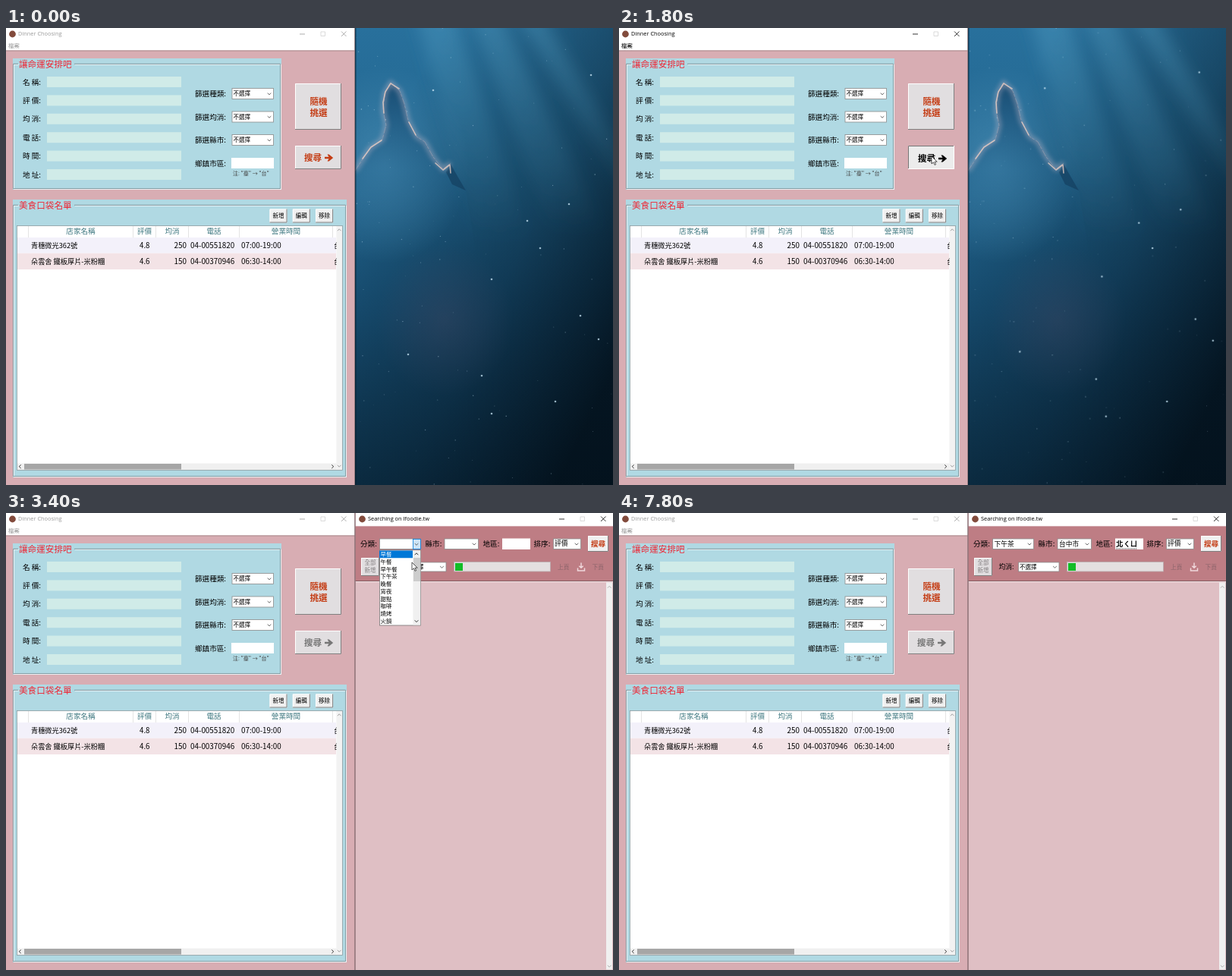
These frames come from a looping animation (800 by 602 pixels, 8000 ms). An HTML page:

```html
<!DOCTYPE html>
<html lang="zh-Hant">
<head>
<meta charset="utf-8">
<title>Dinner Choosing</title>
<style>
html, body { margin: 0; width: 100%; height: 100%; overflow: hidden; background: #d8adb3; }
svg { display: block; width: 100%; height: 100%; }
text { font-family: "Noto Sans CJK TC", "Noto Sans CJK", sans-serif; font-weight: 500; white-space: pre; }
.ui { font-family: "Open Sans", "Noto Sans", sans-serif; font-weight: 400; }
.thin { font-weight: 400; }
.bold { font-weight: 700; }

/* One step is 200 ms, or 2.5 %. */
.anim { animation: 8s step-end infinite; }
.star { animation: drift 8s steps(10) infinite; }
.main-title { animation-name: main-title; }
.find-title { animation-name: find-title; }
.ready { animation-name: ready; }
.pressed { animation-name: pressed; }
.disabled, .find { animation-name: opened; }
.kinds { animation-name: kinds; }
.cities { animation-name: cities; }
.kind-value { animation-name: kind-value; }
.city-value { animation-name: city-value; }
.kind-row { animation-name: kind-row; }
.city-row { animation-name: city-row; }
.arrow { animation-name: arrow; }
.beam { animation-name: beam; }
.type1 { animation-name: type1; }
.type2 { animation-name: type2; }
.type3 { animation-name: type3; }
.type4 { animation-name: type4; }

@keyframes drift { 25%, 100% { transform: translate(var(--dx), var(--dy)); } }
@keyframes main-title { 0% { color: #999; } 22.5% { color: #000; } 37.5%, 100% { color: #999; } }
@keyframes find-title { 0% { color: #999; } 37.5%, 100% { color: #000; } }
@keyframes ready { 0% { opacity: 1; } 22.5%, 100% { opacity: 0; } }
@keyframes pressed { 0% { opacity: 0; } 22.5% { opacity: 1; } 25%, 100% { opacity: 0; } }
@keyframes opened { 0% { opacity: 0; } 25%, 100% { opacity: 1; } }
@keyframes kinds { 0% { opacity: 0; } 37.5% { opacity: 1; } 47.5%, 100% { opacity: 0; } }
@keyframes cities { 0% { opacity: 0; } 60% { opacity: 1; } 72.5%, 100% { opacity: 0; } }
@keyframes kind-value { 0% { opacity: 0; } 47.5%, 100% { opacity: 1; } }
@keyframes city-value { 0% { opacity: 0; } 72.5%, 100% { opacity: 1; } }
@keyframes kind-row { 0% { transform: none; } 45%, 100% { transform: translateY(29.25px); } }
@keyframes city-row {
  0% { transform: none; } 65% { transform: translateY(19.5px); }
  67.5% { transform: translateY(48.75px); } 70%, 100% { transform: translateY(68.25px); }
}
@keyframes arrow {
  0% { opacity: 0; transform: translate(428px, 232px); }
  12.5% { opacity: 1; transform: translate(428px, 232px); }
  15% { opacity: 1; transform: translate(414px, 192px); }
  17.5% { opacity: 1; transform: translate(413px, 182px); }
  20% { opacity: 1; transform: translate(412px, 171px); }
  22.5% { opacity: 1; transform: translate(412px, 169px); }
  27.5% { opacity: 1; transform: translate(410px, 168px); }
  32.5% { opacity: 1; transform: translate(470px, 110px); }
  35% { opacity: 1; transform: translate(535px, 44px); }
  37.5% { opacity: 1; transform: translate(541px, 40px); }
  40% { opacity: 1; transform: translate(540px, 48px); }
  42.5% { opacity: 1; transform: translate(535px, 65px); }
  45% { opacity: 1; transform: translate(528px, 81px); }
  50% { opacity: 1; transform: translate(560px, 62px); }
  52.5% { opacity: 1; transform: translate(590px, 48px); }
  55% { opacity: 1; transform: translate(617px, 40px); }
  62.5% { opacity: 1; transform: translate(612px, 54px); }
  65% { opacity: 1; transform: translate(596px, 73px); }
  67.5% { opacity: 1; transform: translate(594px, 101px); }
  70% { opacity: 1; transform: translate(593px, 119px); }
  75% { opacity: 1; transform: translate(628px, 60px); }
  77.5%, 100% { opacity: 0; transform: translate(652px, 41px); }
}
@keyframes beam {
  0% { opacity: 0; } 77.5% { opacity: 1; transform: none; }
  85% { opacity: 1; transform: translateX(1px); } 90%, 100% { opacity: 0; }
}
@keyframes type1 { 0% { opacity: 0; } 90% { opacity: 1; } 92.5%, 100% { opacity: 0; } }
@keyframes type2 { 0% { opacity: 0; } 92.5% { opacity: 1; } 95%, 100% { opacity: 0; } }
@keyframes type3 { 0% { opacity: 0; } 95% { opacity: 1; } 97.5%, 100% { opacity: 0; } }
@keyframes type4 { 0% { opacity: 0; } 97.5%, 100% { opacity: 1; } }
</style>
</head>
<body>
<svg id="stage" viewBox="0 0 800 602" preserveAspectRatio="none"></svg>
<script>
const INK = '#000', ORANGE = '#c43c14', BLUE = '#0078d7';

const rect = (x, y, w, h, fill, more = '') =>
  `<rect x="${x}" y="${y}" width="${w}" height="${h}" fill="${fill}" ${more}/>`;
const path = (d, stroke, width = 1, more = '') =>
  `<path d="${d}" fill="none" stroke="${stroke}" stroke-width="${width}" ${more}/>`;
const text = (x, y, size, str, fill = INK, more = '') =>
  `<text x="${x}" y="${y}" font-size="${size}" fill="${fill}" ${more}>${str}</text>`;
const middle = (x, y, size, str, fill, cls = '') =>
  text(x, y, size, str, fill, `text-anchor="middle" class="${cls}"`);
const group = (cls, ...parts) => `<g class="anim ${cls}">${parts.join('')}</g>`;
const chevron = (x, y, dx, dy, color = '#555') => path(dy
  ? `M${x - 2.3} ${y - dy}l2.3 ${2 * dy}l2.3 ${-2 * dy}`
  : `M${x - dx} ${y - 2.3}l${2 * dx} 2.3l${-2 * dx} 2.3`, color, 0.9);

function button(x, y, w, h, fill = '#e1dee0', sunk = false) {
  const [light, dark] = sunk ? ['#777', '#fff'] : ['#fff', '#808080'];
  return rect(x, y, w, h, fill) +
    path(`M${x + .5} ${y + h}V${y + .5}H${x + w}`, light) +
    path(`M${x} ${y + h - .5}H${x + w - .5}V${y}`, dark);
}

function combo(x, y, w, h, value = '', size = 7.5) {
  return rect(x + .5, y + .5, w - 1, h - 1, '#fff', 'stroke="#8a8a8a" stroke-width=".8"') +
    chevron(x + w - 6, y + h / 2 + .2, 0, 1.1) + text(x + 2, y + h / 2 + 2.7, size, value);
}

function caption(cls, x, title, m) {
  return `<circle cx="${x + 5}" cy="8" r="4.4" fill="#824b3c"/>` + group(cls,
    text(x + 12.5, 10.4, 7.4, title, 'currentColor', 'class="ui"'),
    path(`M${m} 8H${m + 7}M${m + 55} 4.5l6.5 6.5m0-6.5l-6.5 6.5`, 'currentColor', .8)) +
    path(`M${m + 28} 5h5.5v5.5h-5.5z`, '#ccc', .7);
}

function frame(x, y, w, h, title) {
  const line = `M${x + 7} ${y + 7.3}H${x + .6}V${y + h - 1.4}H${x + w - 1.4}V${y + 7.3}H${x + 81}`;
  return rect(x, y, w, h, '#b0d9e3') + path(line, '#fff', .9, 'transform="translate(.9 .9)"') +
    path(line, '#7b8f96', .9) + text(x + 8, y + 12, 11.6, title, '#ee2634');
}

function popup(id, x, w, thumb, names) {
  const list = color => names.map((n, i) => text(x + 1.5, 57.2 + i * 9.75, 7.4, n, color)).join('');
  return group(id === 'kind' ? 'kinds' : 'cities',
    rect(x + w - 10.5, 34.5, 10, 13, '#cce4f7', `stroke="${BLUE}" stroke-width=".8"`),
    chevron(x + w - 6, 41.2, 0, 1.1),
    rect(x + .5, 49, w - 1, 99, '#fff', 'stroke="#777" stroke-width=".8"'), list(INK),
    `<clipPath id="${id}"><rect class="anim ${id}-row" x="${x}" y="49.6" width="${w - 11}" height="9.75"/></clipPath>`,
    `<g clip-path="url(#${id})">${rect(x, 49, w, 99, BLUE)}${list('#fff')}</g>`,
    rect(x + w - 10.5, 49.5, 9.7, 98, '#f0f0f0'), rect(x + w - 10, 59, 9, thumb, '#cdcdcd'),
    chevron(x + w - 6, 54, 0, -1.2, '#222'), chevron(x + w - 6, 142.5, 0, 1.2, '#222'));
}

function wallpaper() {
  let seed = 11;
  const rnd = () => (seed = seed * 16807 % 2147483647) / 2147483647;
  const star = (x, y, r, dx, dy, a) => `<circle class="star" cx="${x}" cy="${y}" r="${r}" fill="#c8e6f5"
    opacity="${a}" style="--dx:${dx}px;--dy:${dy}px"/>`;
  const bright = [[771, 62, -7, -4], [742, 232, -2, 8], [640, 331, -4, -4], [704, 290, -1, 0],
    [757, 379, 3, 5], [724, 492, -2, 0], [627, 458, 2, 5], [640, 508, 2, 4], [563, 82, -2, -3],
    [687, 254, -2, 3], [530, 430, -2, -4], [781, 410, 2, 2]];
  let stars = bright.map(([x, y, dx, dy]) => star(x, y, 1.3, dx, dy, .75)).join('');
  for (let i = 0; i < 110; i++) {
    const x = 462 + 336 * rnd() ** 1.6, y = 602 * rnd();
    stars += star(x.toFixed(1), y.toFixed(1), (.3 + .5 * rnd()).toFixed(2),
      (6 * rnd() - 3).toFixed(1), (6 * rnd() - 3).toFixed(1), (.15 + .4 * rnd()).toFixed(2));
  }
  const fade = (id, color, a) => `<radialGradient id="${id}"><stop stop-color="${color}" stop-opacity="${a}"/>
    <stop offset="1" stop-color="${color}" stop-opacity="0"/></radialGradient>`;
  const blob = (x, y, rx, ry, id) => `<ellipse cx="${x}" cy="${y}" rx="${rx}" ry="${ry}" fill="url(#${id})"/>`;
  const slope = 'M460 188L472 170L480 158L496 147L501 128L497 108L499 86L507 72L519 83L525 100L530 122L541 143L552 150L563 170L576 186L586 178';
  const lit = 'M498 112L497 98L500 84L507 73L518 80M470 172L481 157L495 148M531 124L540 141M566 178L576 187L585 180L586 191';
  return `<defs>
    <linearGradient id="sea" x2="0" y2="1"><stop stop-color="#28709c"/><stop offset=".3" stop-color="#22668f"/>
      <stop offset=".62" stop-color="#185075"/><stop offset="1" stop-color="#0e344d"/></linearGradient>
    <linearGradient id="deep" x1=".25" y1=".1" x2="1" y2=".75"><stop stop-color="#03121e" stop-opacity="0"/>
      <stop offset=".55" stop-color="#03121e" stop-opacity=".4"/><stop offset="1" stop-color="#020d16" stop-opacity=".86"/></linearGradient>
    <linearGradient id="ray" x2="0" y2="1"><stop stop-color="#5aa5c8" stop-opacity=".36"/><stop offset="1" stop-color="#5aa5c8" stop-opacity="0"/></linearGradient>
    <linearGradient id="rock" x2="0" y2="1"><stop stop-color="#164469" stop-opacity=".8"/><stop offset=".5" stop-color="#1d5a83" stop-opacity=".3"/>
      <stop offset="1" stop-color="#1d5a83" stop-opacity="0"/></linearGradient>
    ${fade('haze', '#5a9fc6', .5)}${fade('dust', '#54506c', .28)}
    <filter id="soft" x="-50%" y="-50%" width="200%" height="200%"><feGaussianBlur stdDeviation="10"/></filter>
    <filter id="glow" x="-20%" y="-20%" width="140%" height="140%"><feGaussianBlur stdDeviation="3"/></filter>
    <clipPath id="right"><rect x="460" width="340" height="602"/></clipPath></defs>
    <g clip-path="url(#right)">${rect(460, 0, 340, 602, 'url(#sea)')}${rect(460, 0, 340, 602, 'url(#deep)')}
    <g fill="url(#ray)" filter="url(#soft)"><path d="M540-20h50L690 280h-70z"/><path d="M610-20h40L790 270h-70z"/><path d="M670-20h35L830 190v50z"/></g>
    ${blob(500, 180, 110, 130, 'haze')}${blob(578, 385, 90, 100, 'dust')}
    <path d="${slope}L606 214L620 300H460z" fill="url(#rock)"/><path d="M580 190L586 179L592 190L606 214L588 206z" fill="#123a5a" opacity=".6"/>` +
    path(slope, '#c0b6c8', 5, 'opacity=".55" filter="url(#glow)"') +
    path(slope, '#c9b3bb', .8, 'opacity=".5" stroke-linejoin="round" stroke-dasharray="9 1 4 2"') +
    path(lit, '#f0d2c6', 1.6, 'opacity=".75" stroke-linejoin="round" stroke-linecap="round"') +
    `${stars}${rect(460, 0, 1.5, 602, '#071c2b', 'opacity=".6"')}</g>`;
}

function searchButton(cls, color, sunk = false) {
  const d = sunk ? 1 : 0;
  return group(cls, button(381, 155, 61, 31, sunk ? '#ececec' : '#e1dee0', sunk),
    text(393 + d, 175 + d, 11.6, '搜尋', color, 'class="bold"'),
    `<path transform="translate(${d} ${d})" d="M420 169.8h5.5l-2-3.3h2.2l5.5 4.5-5.5 4.5h-2.2l2-3.3h-5.5z" fill="${color}"/>`);
}

function tableRow(y, name, score, cost, phone, hours) {
  return text(33, y, 9.2, name) + text(176, y, 9.7, score) +
    text(238, y, 9.9, cost, INK, 'text-anchor="end"') + text(243, y, 9.9, phone) + text(310, y, 9.9, hours) +
    `<g clip-path="url(#cells)">${text(432, y, 9.2, '台')}</g>`;
}

function mainWindow() {
  const fields = ['名 稱:', '評 價:', '均 消:', '電 話:', '時 間:', '地 址:'].map((label, i) =>
    text(22, 74.6 + i * 24.4, 9.6, label) + rect(54, 64 + i * 24.4, 177, 14, '#d0ebe8')).join('');
  const filters = ['篩選種類:', '篩選均消:', '篩選縣市:', '鄉鎮市區:'].map((label, i) =>
    text(249, 90 + i * 30.5, 9.6, label) +
    (i < 3 ? combo(297.5, 79 + i * 30.5, 55.5, 15, '不選擇') : rect(297, 171, 56, 14, '#fff'))).join('');
  const tools = ['新增', '編輯', '移除'].map((label, i) =>
    button(347.5 + i * 30.3, 238.5, 23, 18, '#f0f0f0') + middle(359 + i * 30.3, 250.4, 7.6, label, INK)).join('');
  const heads = [['店家名稱', 98.5], ['評價', 182.5], ['均消', 219], ['電話', 274], ['營業時間', 369]]
    .map(([label, x]) => middle(x, 271.4, 9.6, label, '#3f7880', 'thin')).join('');
  return rect(0, 0, 460, 602, '#d8adb3') + rect(0, 0, 460, 29.5, '#fff') + rect(0, 29.5, 460, 1, '#a98a8e') +
    caption('main-title', 3.5, 'Dinner Choosing', 387) +
    group('main-title', text(3, 25.6, 7.4, '檔案', 'currentColor', 'class="thin"')) +
    frame(9, 40, 354, 173, '讓命運安排吧') + fields + filters +
    text(299, 193.6, 7, '注: "臺" → "台"', '#444', 'class="thin"') +
    button(381, 73, 61, 61) + middle(412, 101, 11.6, '隨機', ORANGE, 'bold') + middle(412, 116, 11.6, '挑選', ORANGE, 'bold') +
    searchButton('ready', ORANGE) + searchButton('pressed', '#000', true) + searchButton('disabled', '#777') +
    frame(9, 226, 440, 366, '美食口袋名單') + tools +
    rect(14.5, 260.5, 429, 322, '#fff', 'stroke="#8b9ba0" stroke-width=".8"') +
    rect(15, 276, 420, 20.7, '#f3f1fa') + rect(15, 296.7, 420, 21.3, '#f3e3e6') +
    path('M29.5 261v15M167.5 261v15M197.5 261v15M240.5 261v15M307.5 261v15M430.5 261v15', '#ddd', .8) + heads +
    '<clipPath id="cells"><rect x="15" y="276" width="421" height="45"/></clipPath>' +
    tableRow(289.6, '青穗微光362號', '4.8', '250', '04-00551820', '07:00-19:00') +
    tableRow(310.9, '朵雲舍 鐵板厚片-米粉糰', '4.6', '150', '04-00370946', '06:30-14:00') +
    rect(435.5, 261, 7.5, 321, '#f2f2f2') + rect(15, 573.5, 420.5, 8.5, '#f0f0f0') + rect(24, 574, 207, 7.5, '#a6a6a6') +
    chevron(439.2, 266, 0, -1.2, '#999') + chevron(439.2, 577, 0, 1.2, '#999') +
    chevron(18.5, 577.7, -1.2, 0, '#222') + chevron(430.5, 577.7, 1.2, 0, '#222') +
    path('M459.5 0V602', '#8c7478', .8);
}

function typed(cls, str) {
  const end = 655 + 9.4 * str.length;
  return group(cls, text(655, 44.3, 9.4, str, '#000', 'class="bold"'),
    path(`M655 47H${end}`, '#000', .9, 'stroke-dasharray="1 1"'));
}

function findWindow() {
  const labels = [['分類:', 467], ['縣市:', 552.5], ['地區:', 628.5], ['排序:', 695.5]]
    .map(([label, x]) => text(x, 44.4, 9.6, label)).join('');
  return group('find',
    rect(460, 0, 340, 602, '#dfbfc4'), rect(460, 0, 340, 17.5, '#fff'), rect(460, 17.5, 340, 72, '#be7d84'),
    path('M460 89.5H800', '#7d5458', .9), path('M460 90.7H800', '#f3e3e5', 1), path('M460.5 0V602', '#96777b', .8),
    caption('find-title', 464.5, 'Searching on Ifoodie.tw', 729), labels,
    combo(492, 33.5, 55, 14.5), combo(577.5, 33.5, 45.5, 14.5), rect(654, 33.5, 37, 14.5, '#fff'),
    combo(721, 33.5, 37, 14.5, '評價', 8.7),
    button(767, 30, 27, 21, '#f0f0f0'), middle(780.5, 44.2, 9.6, '搜尋', ORANGE, 'bold'),
    button(468, 59, 24, 24), middle(480, 68.3, 7.5, '全部', '#858082'), middle(480, 78.3, 7.5, '新增', '#858082'),
    text(500.5, 74.2, 8.8, '均消:'), combo(526, 64.5, 54.5, 13, '不選擇'),
    rect(590.5, 64.5, 127, 12.5, '#e4dfe0', 'stroke="#b9aaac" stroke-width=".8"'), rect(592, 66, 10, 10, '#12bd27'),
    text(727, 74, 7.7, '上頁', '#8c646a'), text(772.5, 74, 7.7, '下頁', '#8c646a'),
    path('M758 65.5V72M755.3 69.7L758 72.3L760.7 69.7M753.5 72.5V76H762.5V72.5', '#f0d8db', 1.5),
    rect(791, 91.5, 8, 510, '#f0f0f0'), chevron(795.2, 97.5, 0, -1.2, '#aaa'), chevron(795.2, 597, 0, 1.2, '#aaa'),
    group('kind-value', text(494.5, 44, 8.7, '下午茶')), group('city-value', text(580, 44, 8.7, '台中市')),
    popup('kind', 492, 55, 31, '早餐 午餐 早午餐 下午茶 晚餐 宵夜 甜點 咖啡 燒烤 火鍋'.split(' ')),
    popup('city', 578, 45.5, 44, '基隆市 台北市 新北市 桃園市 新竹市 新竹縣 苗栗縣 台中市 彰化縣 南投縣'.split(' ')),
    typed('type1', 'ㄅ'), typed('type2', 'ㄅㄟ'), typed('type3', '北'), typed('type4', '北ㄑㄩ'));
}

const pointer = group('beam', path('M650 35.5H652M653 35.5H655M652.5 36V47M650 47.5H652M653 47.5H655', '#222', .8)) +
  group('arrow', '<path d="M0 0V10L2.4 7.8 4 11.4 5.6 10.7 4 7.2H7.2Z" fill="#fff" stroke="#111" stroke-width=".7"/>');

document.getElementById('stage').innerHTML = wallpaper() + mainWindow() + findWindow() + pointer;
</script>
</body>
</html>
```
